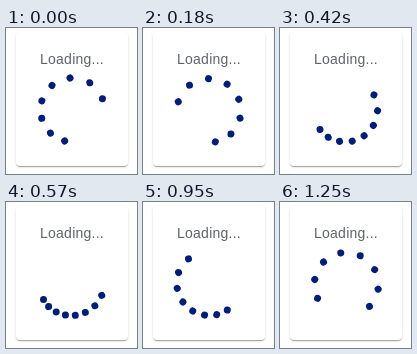
An HTML page for the animation above (1270 ms loop, 131 by 146 pixels).

```html
<!DOCTYPE html>
<html lang="en">
<head>
<meta charset="utf-8">
<title>Loading</title>
<style>
  html, body { margin: 0; width: 100%; height: 100%; overflow: hidden; background: #fff; }
  .card {
    position: absolute; left: 10px; top: 4px; width: 112px; height: 134px;
    border-radius: 4px; background: #fff;
    box-shadow: 0 2px 1px -1px rgba(0,0,0,.2), 0 1px 1px rgba(0,0,0,.14), 0 1px 3px rgba(0,0,0,.12);
  }
  .label {
    position: absolute; left: 0; top: 16px; width: 100%;
    font: 14px/22px "Liberation Sans", Arial, sans-serif; letter-spacing: .25px;
    text-align: center; white-space: nowrap; color: #5f6368;
  }
  .roller { position: absolute; left: 16px; top: 38px; width: 80px; height: 80px; }
  .roller div { position: absolute; inset: 0; }
  .roller i {
    position: absolute; width: 7px; height: 7px; margin: -4px 0 0 -4px;
    border-radius: 50%; background: #001e78;
  }
</style>
</head>
<body>
<div class="card">
  <div class="label">Loading...</div>
  <div class="roller"></div>
</div>
<script>
const LOOP = 1270, STEPS = 43;     // stepped playback, ms per loop
const STEP_MS = 31.25, TURN = 1200; // spinner time per step and per turn
const START = 362, LAG = 36;
const places = [[63, 63], [56, 68], [48, 71], [40, 72], [32, 71], [24, 68], [17, 63], [12, 56]];

const roller = document.querySelector('.roller');
const arms = places.map(([x, y]) => {
  const arm = document.createElement('div');
  const dot = document.createElement('i');
  dot.style.left = x + 'px';
  dot.style.top = y + 'px';
  arm.append(dot);
  roller.append(arm);
  return arm;
});

// cubic-bezier(.5, 0, .5, 1)
function ease(x) {
  let lo = 0, hi = 1;
  for (let i = 0; i < 24; i++) {
    const s = (lo + hi) / 2;
    if (1.5 * s * (1 - s) + s ** 3 < x) lo = s; else hi = s;
  }
  return lo * lo * (3 - 2 * lo);
}

function draw(now) {
  const step = Math.floor((now % LOOP) * STEPS / LOOP);
  arms.forEach((arm, i) => {
    const turn = (START + LAG * i + step * STEP_MS) / TURN % 1;
    arm.style.transform = `rotate(${360 * ease(turn)}deg)`;
  });
}

const begin = performance.now();
function tick() {
  draw(performance.now() - begin);
  requestAnimationFrame(tick);
}
tick();
</script>
</body>
</html>
```
